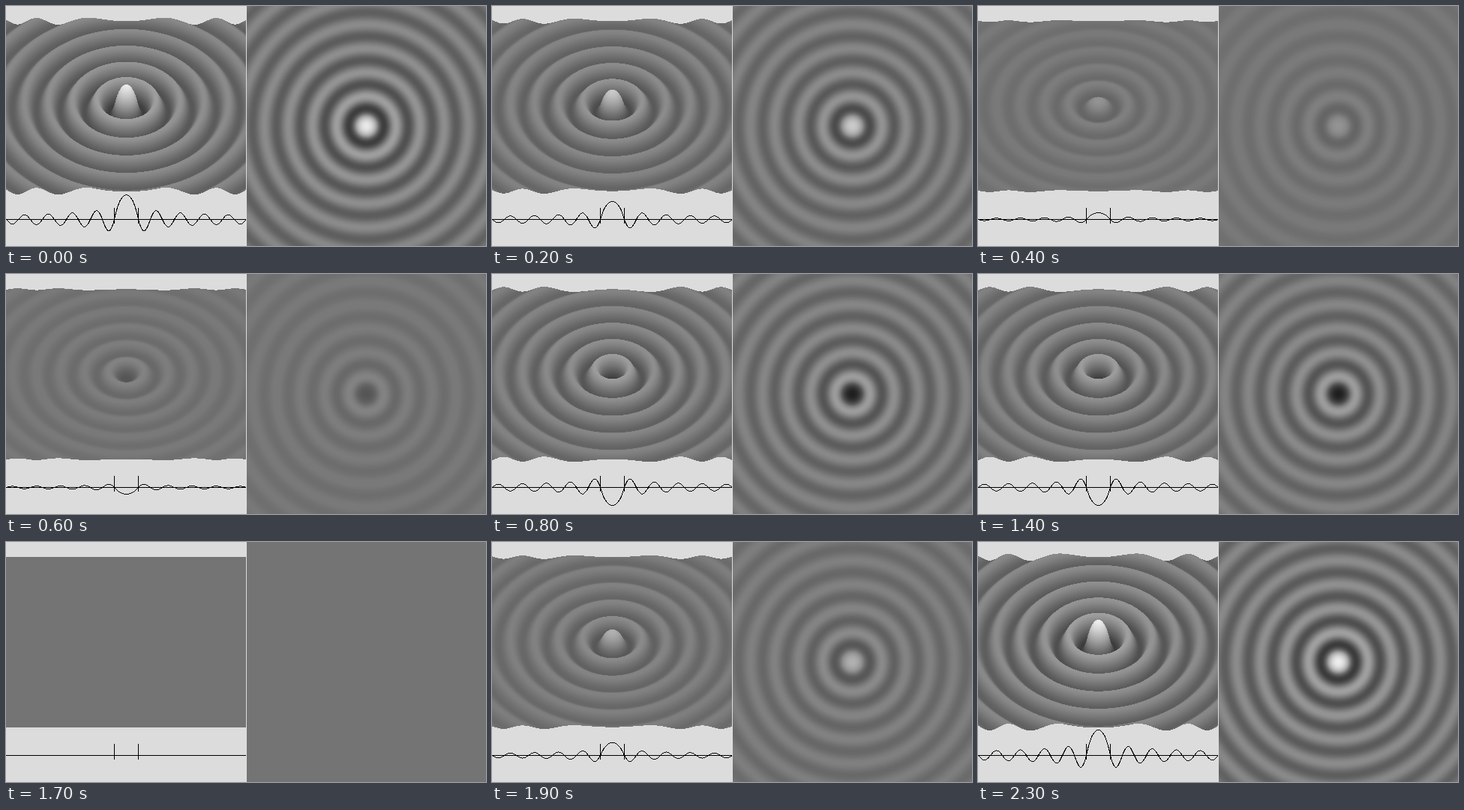
A matplotlib script for the animation above (2400 ms loop, 640 by 321 pixels).

```python
import numpy as np
import matplotlib.pyplot as plt
from matplotlib.animation import FuncAnimation

W, H, DPI = 640, 321, 100
FRAMES, INTERVAL = 24, 100
HALF_WAVE = 16            # px between zeros of the wave
BACKGROUND = 220
TILT = np.sqrt(0.5)       # vertical foreshortening of the 3D view
RELIEF = 40 * TILT        # screen height of a unit crest
AXIS_Y, PROFILE = 285, 34


def wave(r):
    """Standing circular wave: domed core, then 1/sqrt(r) decay."""
    x = np.pi * np.abs(r) / HALF_WAVE
    q = (x / np.pi) ** 2
    core = (1 - q) * (1 + 0.18 * q)
    outer = np.sin(x) / np.sqrt(np.maximum(x, 1))
    return np.where(x < np.pi, core, outer)


def gray(h):
    return np.clip(116 + 121 * h, 0, 255)


cols = np.arange(320)
xs = cols - 160
depth = np.linspace(-160, 160, 1601)
surface = wave(np.hypot(xs[None, :], depth[:, None]))
profile = wave(xs)

u = np.arange(321, W) - 480
v = np.arange(H) - 160
top_view = wave(np.hypot(u[None, :], v[:, None]))

# fine steps along the curve, used to join neighbouring pixels
steps = (np.arange(319 * 8) + 0.5) / 8


def draw_relief(img, amp):
    h = amp * surface
    rows = np.floor(134 + TILT * depth[:, None] - RELIEF * h).astype(int)
    for row, tone in zip(rows, gray(h)):   # back to front
        img[row, cols] = tone


def draw_profile(img, amp):
    ys = np.rint(AXIS_Y - PROFILE * amp * profile)
    line = np.rint(np.interp(steps, cols, ys)).astype(int)
    img[line, np.rint(steps).astype(int)] = 0
    img[AXIS_Y, :320] = 0
    for x in (160 - HALF_WAVE, 160 + HALF_WAVE):
        img[270:291, x] = 0


def render(amp):
    img = np.full((H, W), float(BACKGROUND))
    img[:, 321:] = gray(amp * top_view)
    draw_relief(img, amp)
    draw_profile(img, amp)
    return img


fig = plt.figure(figsize=(W / DPI, H / DPI), dpi=DPI)
ax = fig.add_axes([0, 0, 1, 1])
ax.axis("off")
image = ax.imshow(np.full((H, W), BACKGROUND), cmap="gray", vmin=0, vmax=255,
                  extent=(0, W, H, 0), interpolation="nearest", aspect="auto")


def update(i):
    image.set_data(render(np.cos(2 * np.pi * (i + 1) / FRAMES)))
    return image,


anim = FuncAnimation(fig, update, frames=FRAMES, interval=INTERVAL,
                     repeat=True, repeat_delay=0)
plt.show()
```
